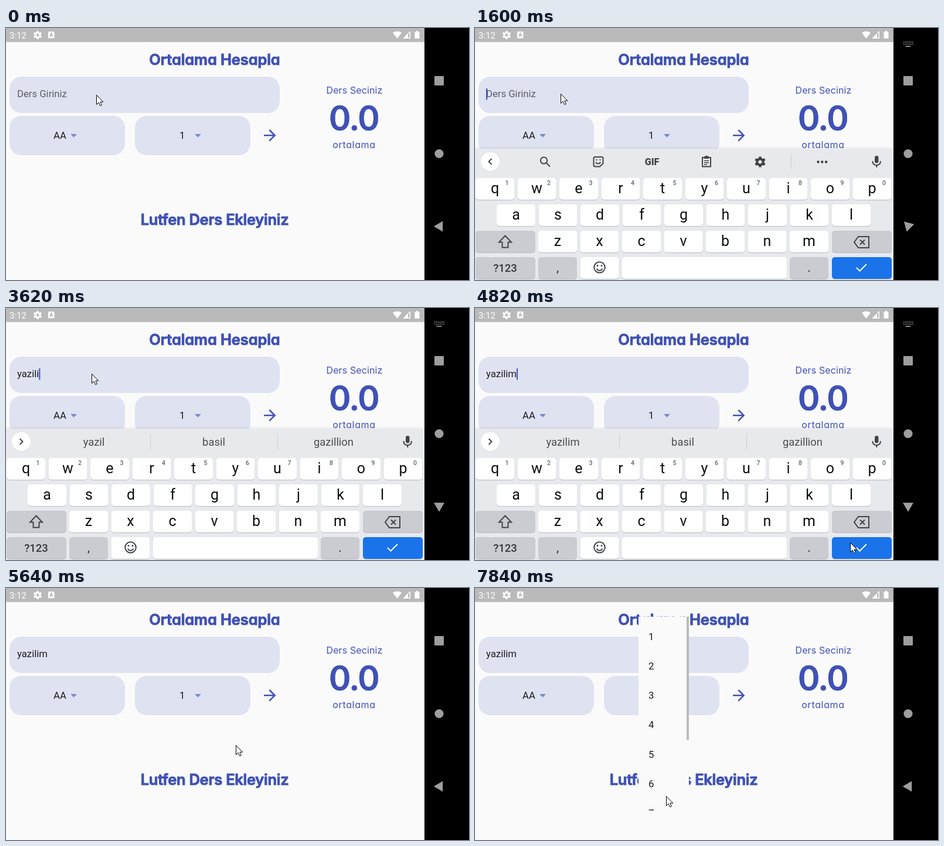
These frames come from a looping animation (790 by 430 pixels, 8 s). An HTML page:

```html
<!DOCTYPE html>
<html lang="tr">
<head>
<meta charset="utf-8">
<title>Ortalama Hesapla</title>
<style>
  html, body { margin: 0; width: 100%; height: 100%; overflow: hidden; background: #000; }
  svg { display: block; width: 790px; height: 430px; }
  text { font-family: Roboto, sans-serif; white-space: pre; }
  .round { font-family: Inter, Lato, sans-serif; font-feature-settings: "cv11"; fill: #3f51b5; text-anchor: middle; }
  .head { font-size: 25.5px; font-weight: 600; stroke: #3f51b5; stroke-width: 1; stroke-linejoin: round; }
  .small { font-size: 16px; font-weight: 400; }
  .score { font-family: Lato, sans-serif; font-size: 60px; font-weight: 700; stroke: #3f51b5; stroke-width: .5; }
  .body { font-size: 16.7px; fill: #1b1b20; }
  .hint { fill: #5b5c66; }
  .box { fill: #dfe2f1; }
  .drop { fill: #7986cb; }
  .nav { fill: #9e9e9e; }
  .line { fill: none; stroke: #414447; stroke-width: 2; }
  .ink { fill: #414447; }
  .letter { font-size: 25px; fill: #0c0d0e; text-anchor: middle; }
  .digit { font-size: 10.5px; font-weight: 500; fill: #5f6165; text-anchor: middle; }
  .word { font-size: 18.4px; fill: #4a4c50; text-anchor: middle; }
  .label { font-size: 18.5px; font-weight: 500; fill: #34373a; text-anchor: middle; }
  .gif { font-size: 16px; font-weight: 900; fill: #414447; text-anchor: middle; }
</style>
</head>
<body>
<svg viewBox="0 0 790 430">
  <defs>
    <path id="gear" d="M-1.5-7h3l.5 2 1.5.8 2-.7 1.5 2.6-1.6 1.4v1.8l1.6 1.4-1.5 2.6-2-.7-1.5.8-.5 2h-3l-.5-2-1.5-.8-2 .7-1.5-2.6 1.6-1.4v-1.8l-1.6-1.4 1.5-2.6 2 .7 1.5-.8zM0-2.4a2.4 2.4 0 1 0 .01 0z" fill-rule="evenodd"/>
    <path id="tri" d="M-5.5-2.5h11l-5.5 5.5z"/>
  </defs>

  <rect width="714" height="430" fill="#fafafa"/>
  <rect width="714" height="24" fill="#bababa"/>
  <g fill="#fff">
    <text x="6" y="18" font-size="15">3:12</text>
    <use href="#gear" x="54" y="12"/>
    <rect x="72" y="6" width="10.5" height="11.5" rx="1.5"/>
    <path d="M74.8 15l2.5-6.5 2.5 6.5M75.7 12.9h3.2" fill="none" stroke="#aaa" stroke-width="1.2"/>
    <path d="M667.5 18l-7.5-10q7.5-5 15 0z"/>
    <path d="M677 18l13-13v13zM686 10.5v6h2.5v-8.5z" fill-rule="evenodd"/>
    <path d="M697.5 7h2v-2h4v2h2v11h-8z"/>
  </g>

  <text class="round head" x="356" y="63" letter-spacing="-.12">Ortalama Hesapla</text>
  <text class="round head" x="356" y="336" letter-spacing="-.27">Lutfen Ders Ekleyiniz</text>
  <text class="round small" x="594.5" y="112" letter-spacing=".12">Ders Seciniz</text>
  <text class="round score" x="594.3" y="175">0.0</text>
  <text class="round small" x="594" y="205" letter-spacing=".65">ortalama</text>

  <rect class="box" x="6" y="83" width="461" height="62" rx="20"/>
  <rect class="box" x="6" y="150" width="197" height="67" rx="20"/>
  <rect class="box" x="220" y="150" width="197" height="67" rx="20"/>
  <text class="body" x="81" y="189">AA</text>
  <use class="drop" href="#tri" x="115.5" y="183.5"/>
  <text class="body" x="296" y="189">1</text>
  <use class="drop" href="#tri" x="327.5" y="183.5"/>
  <path d="M440 183.3h18.5M449.3 174l9.3 9.3-9.3 9.3" fill="none" stroke="#3f51b5" stroke-width="2.5"/>
  <text id="field" class="body" x="19" y="118"></text>
  <rect id="caret" y="103" width="2" height="19.5" fill="#3f51b5"/>

  <g id="menu">
    <clipPath id="menuClip"><rect id="menuArea" x="279" width="86"/></clipPath>
    <g clip-path="url(#menuClip)">
      <rect x="279" y="49" width="86" height="331" fill="#fafafa"/>
      <g id="items"></g>
      <rect id="bar" x="361" y="49" width="4" height="210" fill="#bababa"/>
    </g>
  </g>

  <g id="board">
    <rect y="203" width="714" height="3" opacity=".04"/>
    <rect y="206" width="714" height="234" fill="#e8e9ed"/>
    <rect id="micBack" x="657" y="207" width="56" height="42" fill="#e2e3e6"/>
    <circle cx="26" cy="228.5" r="16" fill="#d5d6da"/>
    <circle cx="26" cy="228" r="16" fill="#fff"/>
    <path id="chevron" class="line" d="M-2.5-5l5 5-5 5"/>
    <g id="tools">
      <g class="line">
        <circle cx="117.5" cy="226" r="5.6"/>
        <path d="M121.5 230l6.5 6.5"/>
        <path d="M205 220h11q2.5 0 2.5 2.5v8.5l-5.5 5.5h-8q-2.5 0-2.5-2.5v-11.5q0-2.5 2.5-2.5zM206 229q4 5 8.5 0M206.5 225h2M212.5 225h2"/>
        <path d="M388 221h14v15.5h-14z"/>
        <path d="M391 226.5h8M391 229.8h8M391 233h5" stroke-width="1.5"/>
      </g>
      <path class="ink" d="M391 219h2q2-3 4 0h2v4h-8z"/>
      <text class="gif" x="302" y="233.5">GIF</text>
      <use class="ink" href="#gear" transform="translate(486.5 228.5) scale(1.3)"/>
      <path d="M539.5 216v24" stroke="#cbccd0"/>
      <path d="M585.5 228.5h.01m6.8 0h.01m6.8 0h.01" stroke="#414447" stroke-width="4.4" stroke-linecap="round"/>
    </g>
    <g id="words">
      <path d="M246.5 215v26M463.5 215v26" stroke="#cbccd0"/>
      <text class="word" x="150" y="235"></text>
      <text class="word" x="354.5" y="235"></text>
      <text class="word" x="559" y="235"></text>
    </g>
    <rect class="ink" x="682" y="218" width="6.5" height="12.5" rx="3.25"/>
    <path class="line" d="M678.5 227q0 7 6.7 7t6.7-7M685.2 234v4"/>
    <g id="keys"></g>
    <path class="line" d="M51.5 354.5l10.5 11h-5.5v9h-10v-9h-5.5z"/>
    <path class="line" d="M654 356h18v19h-18l-7-9.5zM657 361.5l8 8m0-8l-8 8"/>
    <g class="line">
      <circle cx="212.5" cy="408.5" r="9.3"/>
      <path d="M207.5 411q5 6 10 0"/>
    </g>
    <circle class="ink" cx="209" cy="405.5" r="1.5"/>
    <circle class="ink" cx="216" cy="405.5" r="1.5"/>
    <path d="M651 409l5.5 5.5 11.5-11.5" fill="none" stroke="#fff" stroke-width="2"/>
  </g>

  <rect x="714" width="76" height="430"/>
  <g id="ime" fill="none" stroke="#9e9e9e" stroke-width="1.7">
    <path d="M731 24h17M731 27.5h17" stroke-dasharray="1.7 1.3"/>
    <path d="M734.5 31.3h9"/>
  </g>
  <rect class="nav" x="731" y="82" width="16" height="16" rx="1"/>
  <circle class="nav" cx="739" cy="214.5" r="7.6"/>
  <path id="back" class="nav" d="M-9.2 0l15.4-9v18z"/>
  <path id="mouse" d="M.5.5v16l3.7-3.4 2.6 5.6 2.6-1.2-2.5-5.4h4.9z" fill="#fff" stroke="#000"/>
</svg>
<script>
const LOOP = 8000;
const $ = id => document.getElementById(id);

function add(parent, tag, attrs, text = '') {
  const el = document.createElementNS('http://www.w3.org/2000/svg', tag);
  for (const name in attrs) el.setAttribute(name, attrs[name]);
  el.textContent = text;
  parent.append(el);
  return el;
}

function addKey(x, y, width, fill = '#fff') {
  add($('keys'), 'rect', { x, y: y + 1, width, height: 37, rx: 5, fill: '#b8babf' });
  return add($('keys'), 'rect', { x, y, width, height: 37, rx: 5, fill });
}

const PITCH = 71.5, GREY = '#cbccd1';
[['qwertyuiop', 1], ['asdfghjkl', 37], ['zxcvbnm', 108]].forEach(([row, left], r) => {
  [...row].forEach((ch, i) => {
    const x = left + i * PITCH, y = 256 + r * 45;
    addKey(x, y, 66);
    add($('keys'), 'text', { class: 'letter', x: x + 33, y: y + 25.5 }, ch);
    if (r === 0) add($('keys'), 'text', { class: 'digit', x: x + 53.5, y: y + 12 }, (i + 1) % 10);
  });
});
addKey(1, 346, 102, GREY);
addKey(609, 346, 102, GREY);
addKey(1, 391, 102, GREY);
addKey(108, 391, 66, GREY);
addKey(179.5, 391, 66);
addKey(251, 391, 281);
addKey(537, 391, 66, GREY);
const enter = addKey(609, 391, 102, '#1a73e8');
[['?123', 51.5], [',', 141], ['.', 570]].forEach(([label, x]) =>
  add($('keys'), 'text', { class: 'label', x, y: 416 }, label));

for (let n = 1; n <= 7; n++)
  add($('items'), 'text', { class: 'body', x: 296, y: 38.6 + n * 50.2 }, n);

// Each track lists [start time, value]; a value holds until the next one.
const tracks = {
  mouse: [[0, [154, 114]], [200, [150, 113]], [400, [146, 112]],
    [4420, [230, 180]], [4620, [450, 320]], [4820, [640, 400]], [5220, [590, 386]],
    [5420, [431, 331]], [5640, [392, 268]], [5840, [372, 226]], [6040, [360, 202]],
    [6240, [355, 190]], [6440, [353, 184]], [7040, [351, 208]], [7240, [344, 262]],
    [7440, [335, 312]], [7640, [329, 342]], [7840, [326, 355]]],
  slide: [[0, 240], [1400, 60], [1600, 0], [5420, 10], [5640, 240]],
  turn: [[0, 0], [1400, -30], [1600, -75], [1800, -90], [5420, -75], [5640, 0]],
  caret: [[0, 0], [1600, 1], [2000, .5], [2200, 0], [2600, 1], [5220, 0]],
  typed: [[0, 0], [2600, 1], [2800, 2], [3000, 3], [3200, 4], [3400, 5], [3620, 6], [3820, 7]],
  words: [[0, ''], [2600, 'y you yes'], [2800, 'ya you yeah'], [3000, 'ya yay yard'],
    [3200, 'yaz was jazz'], [3400, 'yazi tail mail'], [3620, 'yazil basil gazillion'],
    [4020, 'yazilim basil gazillion'], [5220, '']],
  enter: [[0, '#1a73e8'], [5020, '#1765cc'], [5220, '#1a73e8']],
  menu: [[0, [58, 0]], [6840, [58, 50]], [7040, [49, 331]]],
  bar: [[0, 0], [7040, .5], [7240, 1]]
};
const at = (name, t) => tracks[name].findLast(([start]) => start <= t)[1];
const show = (id, on) => $(id).setAttribute('visibility', on ? 'visible' : 'hidden');
const set = (id, name, value) => $(id).setAttribute(name, value);
const suggestions = $('words').querySelectorAll('text');

function draw(t) {
  const count = at('typed', t), words = at('words', t).split(' ');
  const field = $('field');
  field.textContent = count ? 'yazilim'.slice(0, count) : 'Ders Giriniz';
  field.classList.toggle('hint', !count);
  set('caret', 'x', 19 + (count ? field.getComputedTextLength() : 0));
  set('caret', 'opacity', at('caret', t));

  set('board', 'transform', `translate(0 ${at('slide', t)})`);
  set('chevron', 'transform', `translate(26 228) scale(${count ? 1 : -1} 1)`);
  show('tools', !count);
  show('words', words.length > 1);
  suggestions.forEach((el, i) => { el.textContent = words[i] || ''; });
  show('micBack', t >= 5220);
  enter.setAttribute('fill', at('enter', t));

  show('ime', t >= 1200 && t < 5420);
  set('back', 'transform', `translate(739 338.5) rotate(${at('turn', t)})`);

  const [top, height] = at('menu', t);
  set('menuArea', 'y', top);
  set('menuArea', 'height', height);
  set('bar', 'opacity', at('bar', t));
  set('mouse', 'transform', `translate(${at('mouse', t)})`);
}

const start = performance.now();
function tick() {
  draw((performance.now() - start) % LOOP);
  requestAnimationFrame(tick);
}
tick();
</script>
</body>
</html>
```
